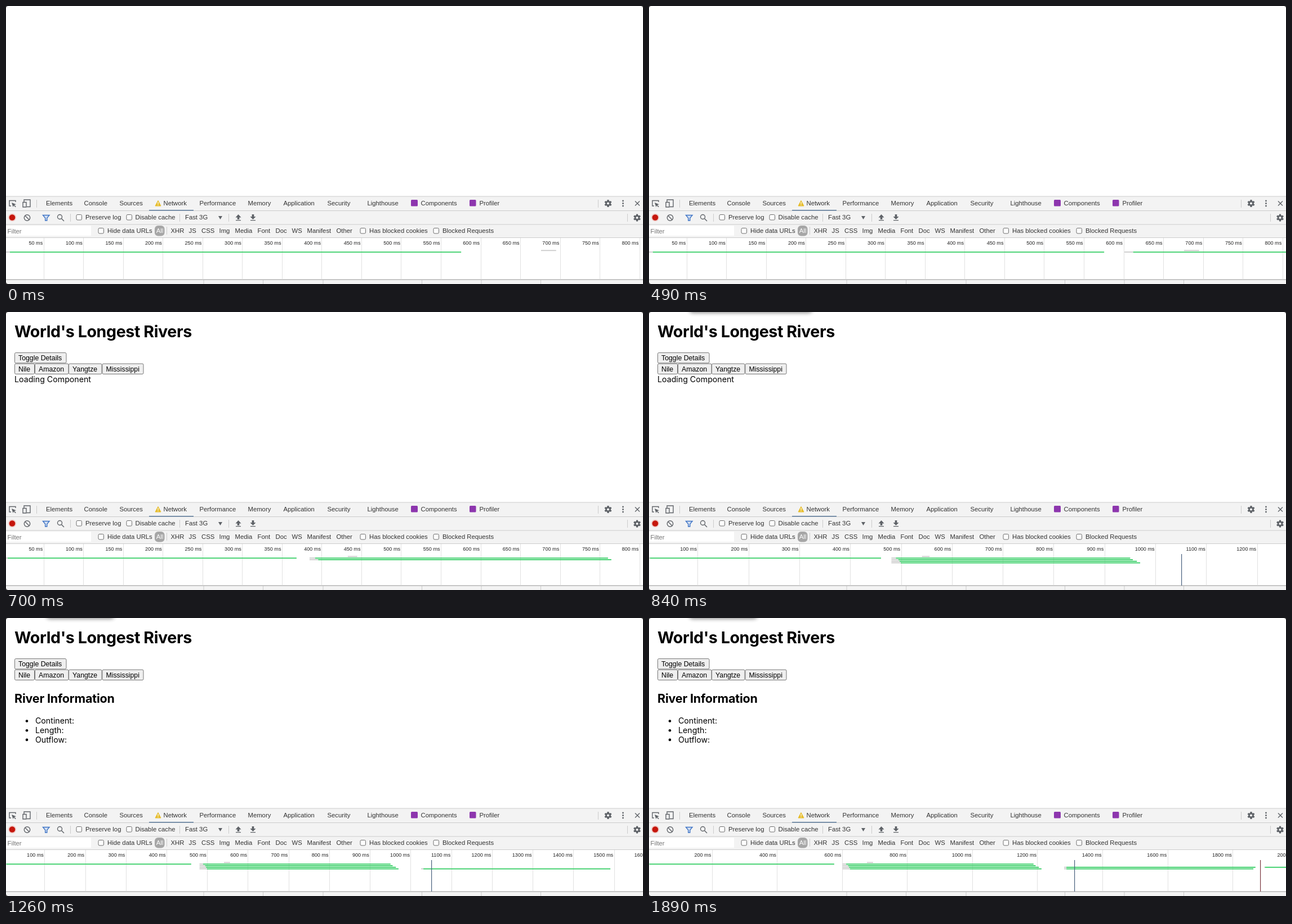
An HTML page that plays this animation: 1131 px wide and 495 px high, repeating every 1.96 s.

```html
<!DOCTYPE html>
<html lang="en">
<head>
<meta charset="utf-8">
<title>Network panel</title>
<style>
html, body { margin: 0; width: 100%; height: 100%; overflow: hidden; background: #fff; }
svg { display: block; width: 1131px; height: 495px; }
text { font-family: "Liberation Sans", Arial, sans-serif; font-size: 11.3px; fill: #333; white-space: pre; }
.page text { font-family: Inter, sans-serif; font-size: 14.2px; fill: #000; }
.page .h1 { font-size: 28.6px; font-weight: 700; letter-spacing: -.4px; }
.page .h2 { font-size: 21.5px; font-weight: 700; letter-spacing: -.2px; }
.page .button { font-family: "Liberation Sans", Arial, sans-serif; font-size: 12.3px; }
.axis text { font-size: 9.1px; text-anchor: end; fill: #222; }
.icon { fill: none; stroke: #5f6368; stroke-width: 1.4; }
.solid { fill: #5f6368; }
</style>
</head>
<body>
<svg id="stage" viewBox="0 0 1131 495">
  <defs><filter id="soft" x="-10%" y="-100%" width="120%" height="300%"><feGaussianBlur stdDeviation="3.5"/></filter></defs>
  <g class="page">
    <g id="intro"></g>
    <text id="loading" x="15" y="125">Loading Component</text>
    <g id="details"></g>
    <rect id="shadow" x="72" y="-14" height="15.5" rx="5" opacity=".45" filter="url(#soft)"/>
  </g>
  <g id="panel"></g>
  <g id="axis" class="axis"></g>
  <g id="bars"></g>
  <g id="frame"></g>
</svg>
<script>
const LOOP = 1960;
const ORIGIN = -3.7;
const BASE_SCALE = 1.4107;
const GREEN = '#3fd06c', GREY = '#c8c8c8', BORDER = '#cbcbcb';

const $ = id => document.getElementById(id);
const text = (x, y, s, cls = '') => `<text x="${x}" y="${y}" class="${cls}">${s}</text>`;
const rect = (x, y, w, h, fill, extra = '') =>
  `<rect x="${x}" y="${y}" width="${w}" height="${h}" fill="${fill}" ${extra}/>`;
const path = (d, cls = 'icon', extra = '') => `<path d="${d}" class="${cls}" ${extra}/>`;
const circle = (x, y, r, cls, extra = '') => `<circle cx="${x}" cy="${y}" r="${r}" class="${cls}" ${extra}/>`;
const labels = (y, list) => list.map(([x, s]) => text(x, y, s)).join('');

function button(x, y, w, label) {
  return rect(x + .5, y + .5, w - 1, 18.4, '#efefef', 'rx="2" stroke="#777"') + text(x + 7, y + 14, label, 'button');
}

function gear(x, y) {
  const teeth = [0, 60, 120].map(a =>
    rect(x - 1.6, y - 6.5, 3.2, 13, '#5f6368', `rx=".6" transform="rotate(${a} ${x} ${y})"`)).join('');
  return teeth + circle(x, y, 4.8, 'solid') + circle(x, y, 2.1, '', 'fill="#f3f3f3"');
}

const checkbox = (x, y) => rect(x + .5, y + .5, 9.5, 9.5, '#fff', 'rx="2" stroke="#6e6e6e"');
const divider = (x, y, h = 14) => rect(x, y, 1, h, '#ccc');

function drawPage() {
  $('intro').innerHTML = text(15, 45.3, "World's Longest Rivers", 'h1') +
    button(15, 72, 92.5, 'Toggle Details') + button(15, 91.6, 36, 'Nile') + button(51, 91.6, 60.5, 'Amazon') +
    button(111, 91.6, 59.5, 'Yangtze') + button(170.5, 91.6, 74, 'Mississippi');
  $('details').innerHTML = text(15, 151, 'River Information', 'h2') +
    ['Continent:', 'Length:', 'Outflow:'].map((s, i) =>
      circle(37, 183.5 + i * 16.7, 2.3, '') + text(52, 188.3 + i * 16.7, s)).join('');
}

function drawPanel() {
  const rows = rect(0, 339, 1131, 156, '#f3f3f3') + rect(0, 412, 1131, 75, '#fff') +
    [338.5, 364, 388.5, 412].map(y => rect(0, y, 1131, 1, BORDER)).join('') +
    rect(0, 486.5, 1131, 1.5, '#b5b5b5') +
    [350.5, 456, 562.5, 738, 843.5, 949].map(x => rect(x, 488, 1, 7, BORDER)).join('') +
    rect(254, 363, 79, 1.4, '#56779a') + rect(0, 391, 151, 18, '#fff');

  const tabs = labels(355, [[71, 'Elements'], [138.5, 'Console'], [201.5, 'Sources'], [279.5, 'Network'],
    [343.5, 'Performance'], [429.5, 'Memory'], [492.5, 'Application'], [570.5, 'Security'],
    [641.5, 'Lighthouse'], [736.5, 'Components'], [840.5, 'Profiler']]) +
    rect(719, 345, 12, 11.5, '#8d36ae', 'rx="1.5"') + rect(823, 345, 11.5, 11.5, '#8d36ae', 'rx="1.5"') +
    path('M270 346.5L275 356H265Z', '', 'fill="#e6bd2b" stroke="#e6bd2b" stroke-linejoin="round"') +
    rect(269.4, 349, 1.2, 3.8, '#fff') + rect(269.4, 353.8, 1.2, 1.2, '#fff') +
    path('M9 356H6V346.5H17V349') + path('M10 350L18 353.2L14.8 354.3L17.8 357.3L16.7 358.2L13.8 355.3L12.5 358Z', 'solid') +
    path('M32 349V345H43V357.5H37M30 349.5H36V358H30Z') +
    divider(54, 345) + divider(1051, 345) + gear(1069, 351.5) +
    [347, 351.5, 356].map(y => circle(1095.5, y, 1.4, 'solid')).join('') +
    path('M1117 347.5L1125 355.5M1125 347.5L1117 355.5');

  const tools = circle(11, 376.5, 7, '', 'fill="#f0c9c5"') + circle(11, 376.5, 5.3, '', 'fill="#c5160c"') +
    circle(37.5, 377, 5.2, 'icon') + path('M33.8 373.3L41.2 380.7') +
    path('M65.5 372.5H77L72.8 377.5V382H69.7V377.5Z', 'icon', 'style="stroke:#3f74c5;fill:#d5e1f3"') +
    circle(95.5, 375.5, 4, 'icon') + path('M98.5 378.5L103 383') +
    checkbox(124.5, 371) + checkbox(213.5, 371) +
    labels(380.3, [[141, 'Preserve log'], [229.5, 'Disable cache'], [318, 'Fast 3G']]) +
    path('M377 374H384L380.5 380Z', 'solid') +
    path('M412.5 371L417.5 376.5H414.3V380H410.7V376.5H407.5ZM408 381H417V382.3H408Z', 'solid') +
    path('M438.5 380L433.5 375H436.7V371H440.3V375H443.5ZM434 381H443V382.3H434Z', 'solid') +
    [114, 308, 395, 1103].map(x => divider(x, 370)).join('') + gear(1120.5, 377);

  const filters = `<text x="2.5" y="405" style="fill:#757575">Filter</text>` +
    [163.5, 628.5, 758.5].map(x => checkbox(x, 395)).join('') +
    rect(264, 391, 17.5, 18.5, '#a6a6a6', 'rx="6"') +
    `<text x="266.8" y="404.3" style="fill:#fff">All</text>` + divider(285, 393) +
    labels(404.3, [[180, 'Hide data URLs'], [292.5, 'XHR'], [324.5, 'JS'], [347, 'CSS'], [378.5, 'Img'],
      [406.5, 'Media'], [446.5, 'Font'], [478.5, 'Doc'], [507.5, 'WS'], [534.5, 'Manifest'],
      [586.5, 'Other'], [645, 'Has blocked cookies'], [775, 'Blocked Requests']]);

  $('panel').innerHTML = rows + tabs + tools + filters;
  $('frame').innerHTML = path('M0 0H3Q1 1 0 3ZM1131 0H1128Q1130 1 1131 3ZM0 495V492Q1 494 3 495Z', '', 'fill="#555"');
}

// Requests in ms: [lane, queued, sent, finished]; an infinite end is still pending.
const REQUESTS = {
  html: [0, 0, 7.5, 575.5],
  cached: [-1, 676, 695, 695],
  pending: [0, 601, 612, Infinity],
  first: [0, 601, 612, 1188],
  second: [1, 601, 618, 1194.5],
  third: [2, 601, 621, 1204.5],
  fourth: [3, 601, 624, 1212.5],
  lazyA: [3, 1282, 1289, 1863.5],
  lazyB: [2, 1282, 1289, 1870],
  last: [2, 1897, 1899, Infinity]
};
const BUNDLES = 'html cached first second third fourth';

// Zoom counts how many times the visible range grew by a quarter; the ruler lags the bars.
const STEPS = [
  { at: 0, ruler: 0, zoom: 0, bars: 'html cached' },
  { at: 490, bars: 'html cached pending' },
  { at: 560, zoom: 2, bars: 'html cached first second' },
  { at: 630, page: true },
  { at: 770, shadow: 217 },
  { at: 840, ruler: 2, zoom: 3, bars: BUNDLES, ready: true },
  { at: 980, shadow: 120 },
  { at: 1260, ruler: 3, zoom: 4, bars: BUNDLES + ' lazyA', details: true },
  { at: 1610, ruler: 4, bars: BUNDLES + ' lazyA lazyB', loaded: true },
  { at: 1820, bars: BUNDLES + ' lazyA lazyB last' }
];
const states = STEPS.reduce((all, step) => [...all, { ...all.at(-1), ...step }], []);

const toX = (ms, zoom) => Math.min(1131, Math.max(0, ms * BASE_SCALE * .8 ** zoom + ORIGIN));

function drawRuler(zoom) {
  const step = [50, 50, 100, 100, 200][zoom];
  let out = '';
  for (let ms = step; ; ms += step) {
    const x = ms * BASE_SCALE * .8 ** zoom + ORIGIN;
    if (x > 1160) return out;
    out += rect(Math.floor(x + .3), 413, 1, 73.5, '#e1e1e1') + text(x - 1.6, 424.5, ms + ' ms');
  }
}

function drawBar([lane, queued, sent, finished], zoom) {
  const y = 437.3 + lane * 2.8;
  const [a, b, c] = [queued, sent, finished].map(ms => toX(ms, zoom));
  return rect(a, y, b - a, 1.7, GREY) + rect(b, y, c - b, 1.9, GREEN);
}

const marker = (ms, zoom, color) => rect(Math.floor(toX(ms, zoom)), 431, 1.2, 56, color);

function draw(s) {
  const show = (id, on) => $(id).style.display = on ? '' : 'none';
  show('intro', s.page);
  show('loading', s.page && !s.details);
  show('details', s.details);
  show('shadow', s.shadow);
  $('shadow').setAttribute('width', s.shadow || 0);
  $('axis').innerHTML = drawRuler(s.ruler);
  $('bars').innerHTML = s.bars.split(' ').map(name => drawBar(REQUESTS[name], s.zoom)).join('') +
    (s.ready ? marker(1314, s.zoom, '#49627f') : '') +
    (s.loaded ? marker(1885.5, s.zoom, '#7c3a42') : '');
}

let current;
function tick() {
  const t = performance.now() % LOOP;
  const next = states.findLast(s => s.at <= t);
  if (next !== current) draw(current = next);
  requestAnimationFrame(tick);
}

drawPage();
drawPanel();
tick();
</script>
</body>
</html>
```
